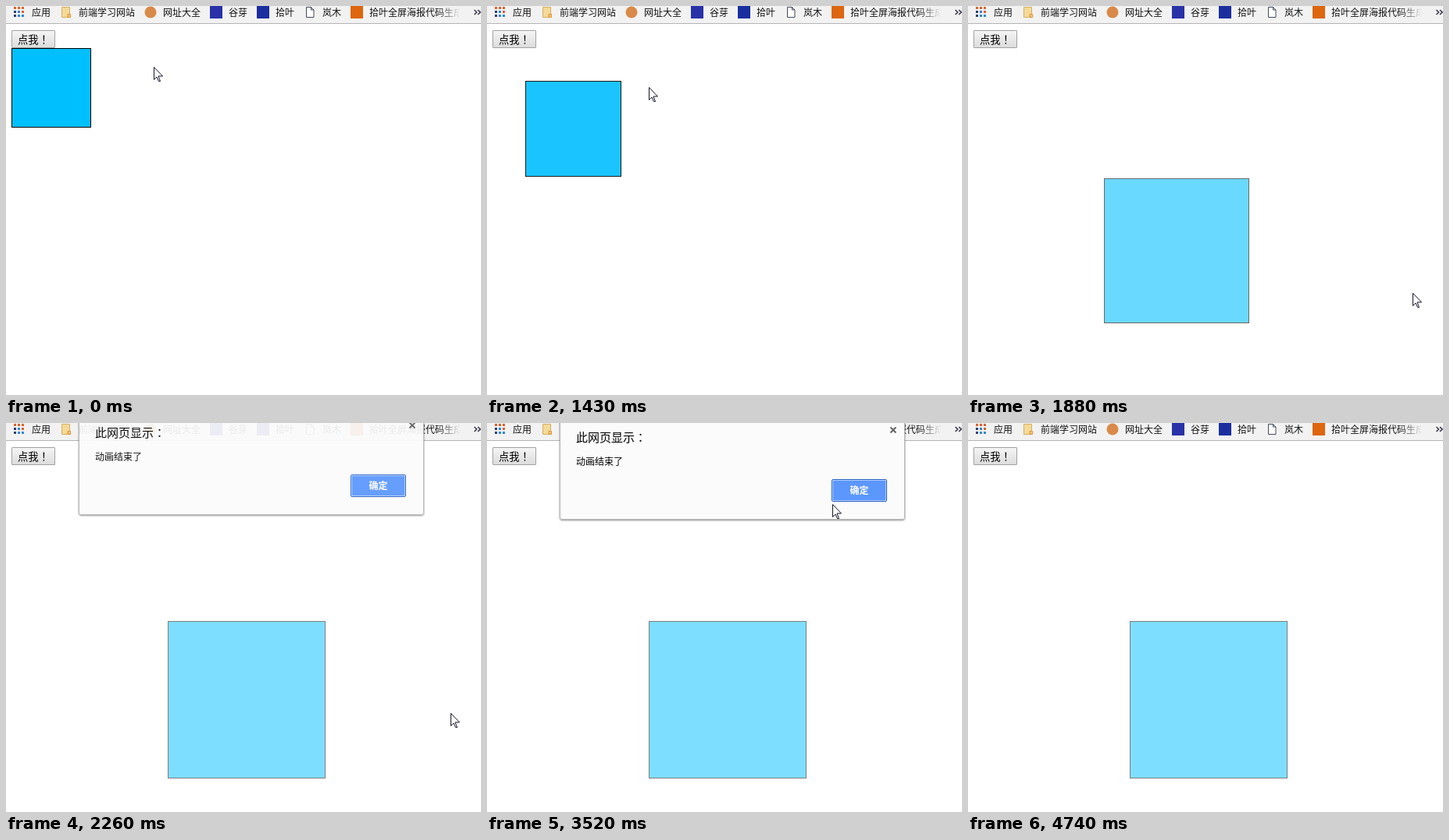
Write an HTML page that moves like this. It is 608 px wide and 499 px high and loops after 5.13 s.

```html
<!DOCTYPE html>
<html lang="zh-CN">
<head>
<meta charset="utf-8">
<style>
  html, body { margin: 0; height: 100%; overflow: hidden; background: #fff; }
  svg { display: block; font: 12px "Noto Sans CJK SC", "Noto Sans CJK", sans-serif; }
  .centred { font-family: "Noto Sans CJK TC", "Noto Sans CJK", sans-serif; }
</style>
</head>
<body>
<svg width="608" height="499" viewBox="0 0 608 499">
  <defs>
    <linearGradient id="fade" gradientUnits="userSpaceOnUse" x1="552" x2="581" y1="0" y2="0">
      <stop stop-color="#111"/>
      <stop offset="1" stop-color="#111" stop-opacity="0"/>
    </linearGradient>
    <linearGradient id="face" x2="0" y2="1">
      <stop stop-color="#f5f5f5"/>
      <stop offset="1" stop-color="#dcdcdc"/>
    </linearGradient>
    <filter id="shadow" x="-5%" y="-5%" width="110%" height="115%">
      <feDropShadow dx="0" dy="1" stdDeviation="1" flood-opacity=".45"/>
    </filter>
  </defs>

  <rect width="608" height="22" fill="#f2f2f2"/>
  <rect y="22" width="608" height="1" fill="#b6b4b6"/>
  <g id="bookmarks" fill="url(#fade)"></g>
  <path d="M599.5 5l3 3-3 3m4.5-6l3 3-3 3" fill="none" stroke="#3c3c50" stroke-width="1.6"/>

  <rect id="button" x="7.5" y="31.5" width="55" height="22" rx=".5" fill="url(#face)"/>
  <text x="15" y="48" font-size="13.333">点我<tspan class="centred" lang="zh-Hant">！</tspan></text>
  <rect id="box" fill="#00bfff" stroke="#000"/>

  <g id="dialog">
    <path d="M93.5-30V121q0 2.5 2.5 2.5H532q2.5 0 2.5-2.5V-30z" fill="#fbfbfb" stroke="#b4b4b4" filter="url(#shadow)"/>
    <text x="114" y="24" font-size="15">此网页显示<tspan class="centred" lang="zh-Hant">：</tspan></text>
    <text x="114" y="53.5">动画结束了</text>
    <path d="M516.5 5.5l7 7m0-7l-7 7" stroke="#666" stroke-width="2"/>
    <rect x="441.5" y="72.5" width="70" height="28" rx="1.5" fill="#5b97ff" stroke="#2b5fc4"/>
    <rect x="442.5" y="73.5" width="68" height="26" fill="none" stroke="#b5d0ff"/>
    <text x="476.5" y="91" text-anchor="middle" font-weight="bold" fill="#fff">确定</text>
  </g>

  <path id="cursor" d="M.5.5v16l3.5-3.5 2.5 5.5h2l-2.5-6.5h5.5z" fill="#fff" stroke="#15152a"/>
</svg>

<script>
const LOOP = 5130;
const $ = id => document.getElementById(id);
const clamp = v => Math.max(0, Math.min(1, v));
const setAttributes = (id, values) => {
  for (const name in values) $(id).setAttribute(name, values[name]);
};

// Bookmarks: every label is followed by the same gap, which holds the next icon.
const square = color => `<rect width="16" height="16" fill="${color}"/>`;
const dot = i => {
  const color = i < 3 || i === 5 ? '#d9622c' : i % 3 ? '#2f86d6' : '#33406c';
  return `<rect x="${1 + i % 3 * 5}" y="${1 + Math.floor(i / 3) * 5}" width="3" height="3" fill="${color}"/>`;
};
const folder = `<path d="M2.5 1.5h10v9l1 1v3h-11z" fill="#f4da98" stroke="#d3ad62"/>
  <path d="M10 14.5v-4h3.5v4z" fill="#f6c272" stroke="#dc9440"/>`;
const sheet = '<path d="M3.5 1.5h6l3.500 3.500v9.500h-9.500zM9.500 1.500v3.500h3.500" fill="#fff" stroke="#444a58"/>';
const bookmarks = [
  ['应用', [...Array(9).keys()].map(dot).join('')],
  ['前端学习网站', folder],
  ['网址大全', '<circle cx="8" cy="8" r="7.5" fill="#d98a48"/>'],
  ['谷芽', square('#2932a8')],
  ['拾叶', square('#1b2ea0')],
  ['岚木', sheet],
  ['拾叶全屏海报代码生成', square('#de660f')]
];
let left = 33;
for (const [label, icon] of bookmarks) {
  $('bookmarks').innerHTML +=
    `<g transform="translate(${left - 24})">${icon}</g><text x="${left}" y="13">${label}</text>`;
  left += label.length * 12 + 36;
}

// Pointer path: time, x, y
const pointer = [
  [0, 189, 78], [390, 186, 77], [700, 53, 51], [1190, 46, 44], [1430, 206, 103],
  [1880, 569, 368], [2560, 569, 375], [2750, 577, 457], [3060, 454, 326],
  [3280, 408, 210], [3520, 442, 104], [3745, 460, 86], [4170, 458, 120], [4740, 586, 500]
];

function pointerAt(t) {
  const i = pointer.findIndex(p => p[0] > t);
  if (i < 0) return pointer.at(-1).slice(1);
  const [t0, x0, y0] = pointer[i - 1], [t1, x1, y1] = pointer[i];
  const k = (t - t0) / (t1 - t0);
  return [Math.round(x0 + (x1 - x0) * k), Math.round(y0 + (y1 - y0) * k)];
}

function draw(t) {
  const [x, y] = pointerAt(t);
  setAttributes('cursor', { transform: `translate(${x} ${y})` });
  const hovered = x >= 7 && x < 63 && y >= 31 && y < 54;
  setAttributes('button', { stroke: hovered ? '#686868' : '#a2a2a2' });

  const swing = .5 - Math.cos(Math.PI * clamp((t - 1115) / 1044)) / 2;
  const corner = 54.5 + Math.round(200 * swing);
  const size = Math.round(101 + 100 * swing);
  setAttributes('box', {
    x: corner - 47, y: corner, width: size, height: size, opacity: 1 - swing / 2
  });

  const hidden = 1 - clamp(Math.min(t - 2070, 4085 - t) / 260);
  setAttributes('dialog', {
    opacity: 1 - hidden ** 2,
    transform: `translate(0 ${Math.round(-24 * hidden)})`
  });
}

const began = performance.now();
function tick() {
  draw((performance.now() - began) % LOOP);
  requestAnimationFrame(tick);
}
tick();
</script>
</body>
</html>
```
